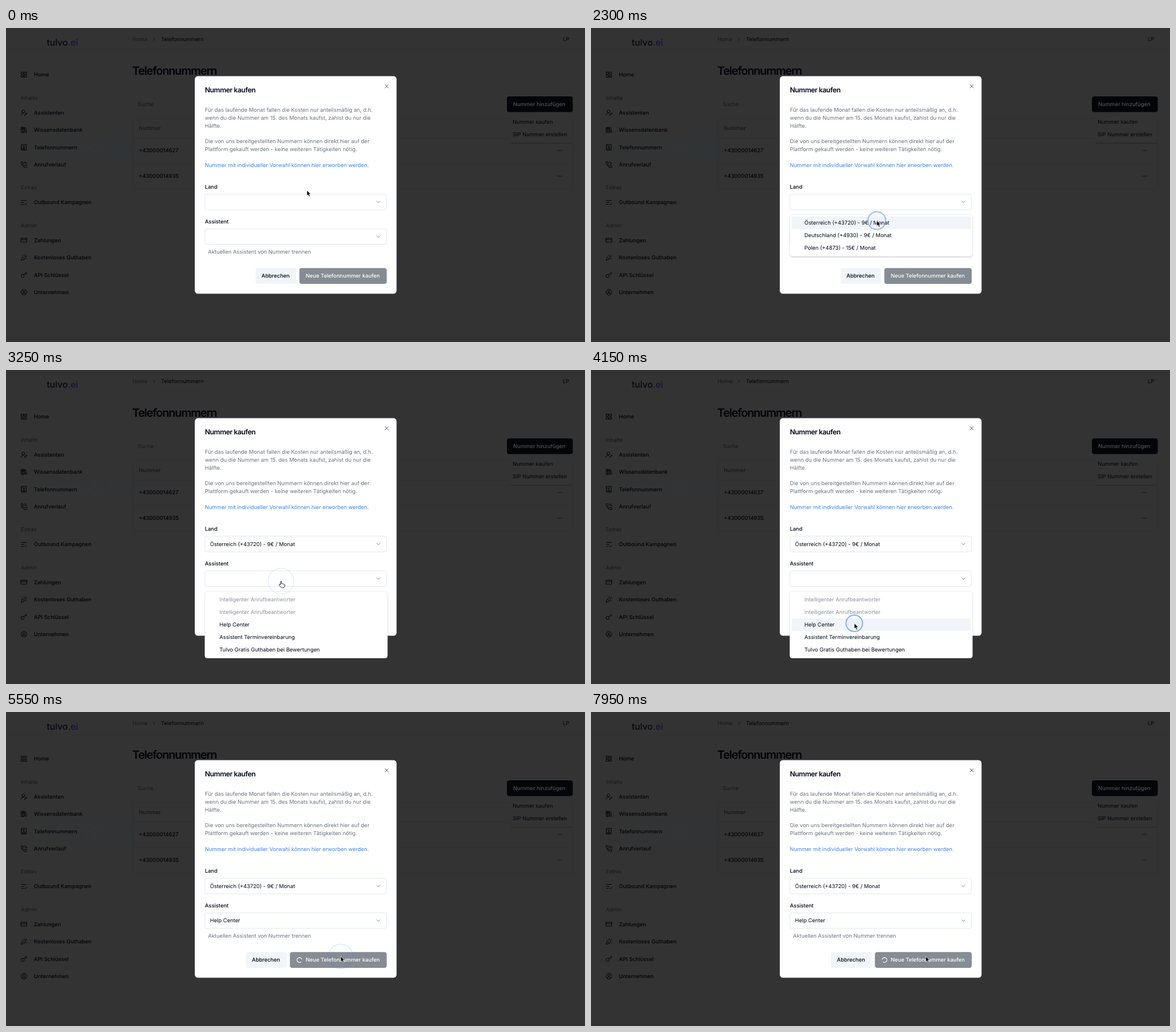
These frames come from a looping animation (1016 by 551 pixels, 8 s). An HTML page:

```html
<!DOCTYPE html>
<html lang="de">
<head>
<meta charset="utf-8">
<title>Nummer kaufen</title>
<style>
  html, body { margin: 0; width: 100%; height: 100%; overflow: hidden; background: #333; }
  svg { display: block; width: 1016px; height: 551px; }
  text {
    font: 400 9.38px Inter, "Liberation Sans", sans-serif;
    text-rendering: geometricPrecision;
    white-space: pre;
  }
  .m { font-weight: 500; }
  .copy { font-size: 9.46px; }
  .title { font-size: 12.2px; font-weight: 600; letter-spacing: -.035em; }
  .h1 { font-size: 20px; font-weight: 600; letter-spacing: -.06em; }
  .logo { font-size: 15.7px; font-weight: 500; }
  .line { fill: none; stroke-linecap: round; stroke-linejoin: round; }
</style>
</head>
<body>
<svg id="stage" viewBox="0 0 1016 551"></svg>
<script>
const LOOP = 8000;
const INK = '#020617', MUTED = '#6b7280', DIM = '#15181d', DARK = '#020308', EDGE = '#e2e8f0', SOFT = '#f1f5f9';

// y is the middle of the capitals
const text = (x, y, s, fill = DARK, cls = '', cap = 3.4) =>
  `<text x="${x}" y="${y + cap}" fill="${fill}" class="${cls}">${s}</text>`;
const rect = (x, y, w, h, r, fill, more = '') =>
  `<rect x="${x}" y="${y}" width="${w}" height="${h}" rx="${r}" fill="${fill}" ${more}/>`;
const line = (d, stroke, width = 1, more = '') =>
  `<path class="line" d="${d}" stroke="${stroke}" stroke-width="${width}" ${more}/>`;
const icon = (y, d) => line(d, DARK, 2, `transform="translate(25.5 ${y - 6}) scale(.5)"`);
const circle = (x, y, r) => `M${x - r} ${y}a${r} ${r} 0 1 0 ${2 * r} 0a${r} ${r} 0 1 0 ${-2 * r} 0`;

const nav = [
  [82, 'Home', 'M3 3h7v7H3zM14 3h7v7h-7zM14 14h7v7h-7zM3 14h7v7H3z'],
  [148.5, 'Assistenten', circle(10, 8, 5) + 'M2 21a8 8 0 0 1 10-7.7M21 13l-7 7v2h2l7-7z'],
  [178.8, 'Wissensdatenbank', 'M3 3h5v18H3zM8 3h5v18H8zM14 5l4-1 4 16-4 1zM3 8h10'],
  [209.3, 'Telefonnummern', 'M4 2h16v20H4zM8 18a4 4 0 0 1 8 0zM2 7h3M2 17h3' + circle(12, 9, 2.5)],
  [239.8, 'Anrufverlauf', 'M3 2h5l2 6-3 2a16 16 0 0 0 7 7l2-3 6 2v5a2 2 0 0 1-2 2A19 19 0 0 1 2 4zM14 2a8 8 0 0 1 8 8M14 6a4 4 0 0 1 4 4'],
  [306, 'Outbound Kampagnen', 'M3 5h18M3 12h10M3 19h7M14 18l3 3 5-6'],
  [372.3, 'Zahlungen', 'M2 5h20v14H2zM2 10h20'],
  [402.7, 'Kostenloses Guthaben', 'M6 10L2 22 14 18zM11 7q4-1 2-5M15 11q1-5 7-5M17 15q4-1 5 2M5 4h.1M20 2h.1M18 10h.1'],
  [433.2, 'API Schlüssel', circle(7.5, 15.5, 5.5) + 'M21 2l-9.6 9.6M15.5 7.5l3 3L22 7l-3-3'],
  [463.6, 'Unternehmen', circle(12, 12, 10) + circle(12, 10, 3.5) + 'M6 19.5a6 5 0 0 1 12 0'],
];

const page = `
  ${rect(14, 195, 208, 28, 4, 'url(#active)')}
  ${line('M0 38.5H1016', '#303133', .8)}
  <text x="71.5" y="31" class="logo" fill="#07080f">tulvo<tspan fill="#15153a">.ei</tspan></text>
  ${nav.map(([y, s, d]) => icon(y, d) + text(49, y, s, DARK, 'm')).join('')}
  ${[[122.5, 'Inhalte'], [280, 'Extras'], [346.3, 'Admin']].map(([y, s]) => text(26, y, s, DIM)).join('')}
  ${text(222, 20, 'Home', DIM)}${line('M258.5 17.5l2.5 2.5-2.5 2.5', DIM)}
  ${text(272, 20, 'Telefonnummern')}${text(977, 20, 'LP')}
  ${text(221.5, 75, 'Telefonnummern', DARK, 'h1', 7)}
  ${text(231, 134, 'Suche', DIM)}
  ${rect(222.5, 158.5, 772, 124.5, 4, 'none', 'stroke="#2e2f31" stroke-width=".8"')}
  ${line('M222 193.5H994M222 238H994', '#2e2f31', .8)}
  ${text(233, 176, 'Nummer', DIM, 'm')}
  ${[[215, '+43000014627'], [260, '+43000014935']].map(([y, s]) =>
    text(233, y, s, DARK, 'm') + line(`M968.2 ${y}h0M971.4 ${y}h0M974.6 ${y}h0`, DARK, 1.6)).join('')}
  ${rect(884, 154, 110, 48, 4, '#333')}${line('M886 202.3H993', '#25262a')}
  ${text(889, 165, 'Nummer kaufen')}${text(889, 187, 'SIP Nummer erstellen')}
  ${rect(879, 120, 115.5, 27.5, 4, '#030508')}${text(890, 133.7, 'Nummer hinzufügen', '#505154', 'm')}`;

const select = (y, id, value) => `
  ${rect(349, y - 13.7, 318.5, 27.5, 4, '#fff', `stroke="${EDGE}"`)}
  ${line(`M650.7 ${y - 1.3}l2.8 2.8 2.8-2.8`, '#80848c')}
  <g id="${id}">${text(358, y, value, INK)}</g>`;

const copy = [
  [143.7, 'Für das laufende Monat fallen die Kosten nur anteilsmäßig an, d.h.'],
  [157.5, 'wenn du die Nummer am 15. des Monats kaufst, zahlst du nur die'],
  [171.4, 'Hälfte.'],
  [199, 'Die von uns bereitgestellten Nummern können direkt hier auf der'],
  [212.8, 'Plattform gekauft werden - keine weiteren Tätigkeiten nötig.'],
];

const dialog = `
  ${rect(331.6, 84.8, 353.5, 381.3, 5, '#fff', `stroke="${EDGE}" stroke-width=".6"`)}
  ${text(349, 108.6, 'Nummer kaufen', INK, 'title', 4.4)}
  ${line('M665.2 99.5l5.6 5.6M670.8 99.5l-5.6 5.6', '#50545c')}
  ${copy.map(([y, s]) => text(349, y, s, MUTED, 'copy')).join('')}
  ${text(349, 240.5, 'Nummer mit individueller Vorwahl können hier erworben werden.', '#3b82f6')}
  ${text(349, 278.5, 'Land', INK, 'm')}${select(305.3, 'land', 'Österreich (+43720) - 9€ / Monat')}
  ${text(349, 339.2, 'Assistent', INK, 'm')}${select(366, 'agent', 'Help Center')}
  ${text(354.5, 392.3, 'Aktuellen Assistent von Nummer trennen', MUTED)}
  <g id="cancel">${rect(437.8, 421.2, 71.7, 27.7, 4, SOFT)}${text(448.3, 435, 'Abbrechen', INK, 'm')}</g>
  <rect id="buy" y="421.2" height="27.7" rx="4"/>
  ${line('M4.3 0A4.3 4.3 0 1 1 1.33 -4.09', '#fff', 1.1, 'id="spin"')}
  ${text(526, 435, 'Neue Telefonnummer kaufen', '#fff', 'm')}`;

// a list of options 22px apart; options starting with "-" are disabled
const menu = (id, y, items, active) => `
  <g id="${id}">
    ${rect(349, y, 320.3, items.length * 22 + 7, 4, '#fff', `stroke="${EDGE}" stroke-width=".6" filter="url(#shadow)"`)}
    ${rect(352.3, y + 3.3 + active * 22, 313.8, 22, 2.5, SOFT, `id="${id}Hover"`)}
    ${items.map((s, i) => text(374.5, y + 14.5 + i * 22, s.replace(/^-/, ''), s[0] === '-' ? '#8f929a' : INK)).join('')}
  </g>`;

const stage = document.getElementById('stage');
stage.innerHTML = `
  <defs>
    <linearGradient id="active"><stop offset="0" stop-color="#333"/><stop offset="1" stop-color="#313436"/></linearGradient>
    <filter id="shadow" x="-5%" y="-10%" width="110%" height="125%"><feDropShadow dx="0" dy="1.4" stdDeviation="1.1" flood-opacity=".18"/></filter>
  </defs>
  ${page}${dialog}
  ${menu('lands', 327.4, ['Österreich (+43720) - 9€ / Monat', 'Deutschland (+4930) - 9€ / Monat', 'Polen (+4873) - 15€ / Monat'], 0)}
  ${menu('agents', 388.5, ['-Intelligenter Anrufbeantworter', '-Intelligenter Anrufbeantworter', 'Help Center', 'Assistent Terminvereinbarung', 'Tulvo Gratis Guthaben bei Bewertungen'], 2)}
  <circle id="ring" fill="#3b82f6" stroke="#4a86e0"/>
  <g id="cursor">
    <path id="arrow" d="M0 0V9.6L2.2 7.6 3.8 11.2 5.6 10.4 4 6.9H6.9Z" fill="#000" stroke="#fff" stroke-width=".7"/>
    <path id="hand" d="M-1 1C-1-.4 1-.4 1 1V4.4C2.2 3.8 3 4.2 3.2 4.9 4 4.4 4.9 4.8 5 5.4 6 5.2 6.6 5.7 6.6 6.5V8.3C6.6 10.4 5 11.6 3 11.6H2C.5 11.6-.4 10.6-1.2 9.3L-3.2 6.6C-3.6 5.6-2.4 5-1.7 5.7L-1 6.4Z" fill="#fff" stroke="#111" stroke-width=".9"/>
  </g>`;

const el = {};
stage.querySelectorAll('[id]').forEach(n => el[n.id] = n);
const set = (n, attrs) => { for (const k in attrs) n.setAttribute(k, attrs[k]); };
const show = (n, on) => n.style.display = on ? '' : 'none';
const clamp = v => Math.min(1, Math.max(0, v));
const ease = p => p * p * (3 - 2 * p);
const mix = (a, b, p) => a + (b - a) * p;

// [start, end, x, y]
const moves = [
  [0, 0, 528, 284.8], [500, 850, 569, 305], [1480, 1800, 501.5, 338],
  [2650, 2950, 484, 365.5], [3200, 3530, 462, 444.5], [4650, 5000, 587.3, 428.8],
];
const clicks = [1000, 2203, 3000, 4075, 5325];
const hands = [[650, 1530], [2820, 3260], [4880, 5400]];
const menus = [['lands', 1000, 2360, 509, 364], ['agents', 3000, 4210, 509, 447]];
const BUSY = 5400;

function draw(t) {
  let x = 0, y = 0;
  for (const [a, b, mx, my] of moves) {
    if (t < a) break;
    const p = b > a ? ease(clamp((t - a) / (b - a))) : 1;
    x = mix(x, mx, p);
    y = mix(y, my, p);
  }
  set(el.cursor, { transform: `translate(${x} ${y})` });
  const hand = hands.some(([a, b]) => t >= a && t < b);
  show(el.hand, hand);
  show(el.arrow, !hand);

  const hit = clicks.find(c => t >= c && t < c + 330);
  show(el.ring, hit !== undefined);
  if (hit !== undefined) {
    const p = (t - hit) / 300, a = clamp(p * 4) * clamp(1.05 - p);
    set(el.ring, { cx: x, cy: y, r: 11 + 14 * p, 'stroke-width': mix(2.2, .9, clamp(p)), 'stroke-opacity': .8 * a, 'fill-opacity': .04 * a });
  }

  for (const [id, open, close, cx, cy] of menus) {
    const p = clamp((t - open) / 135), q = clamp((t - close) / 100);
    show(el[id], p > 0 && q < 1);
    const s = 1 - .05 * Math.max(1 - p, q), dy = -8.6 * (1 - p);
    set(el[id], { opacity: p * (1 - q), transform: `translate(${cx} ${cy + dy}) scale(${s}) translate(${-cx} ${-cy})` });
  }
  show(el.agentsHover, t >= 3400);
  show(el.land, t >= 2360);
  show(el.agent, t >= 4210);

  const busy = t >= BUSY, left = busy ? 498.2 : 514.8;
  const over = t >= 4880;
  set(el.buy, { x: left, width: 668 - left, fill: t < 2360 || busy ? '#878b94' : over ? '#272e3f' : '#0f172a' });
  set(el.cancel, { transform: `translate(${busy ? -16.8 : 0} 0)` });
  show(el.spin, busy);
  set(el.spin, { transform: `translate(515 435.2) rotate(${(t - 5550) * .36 + 50})` });
}

const start = performance.now();
function tick() {
  draw((performance.now() - start) % LOOP);
  requestAnimationFrame(tick);
}
tick();
</script>
</body>
</html>
```
